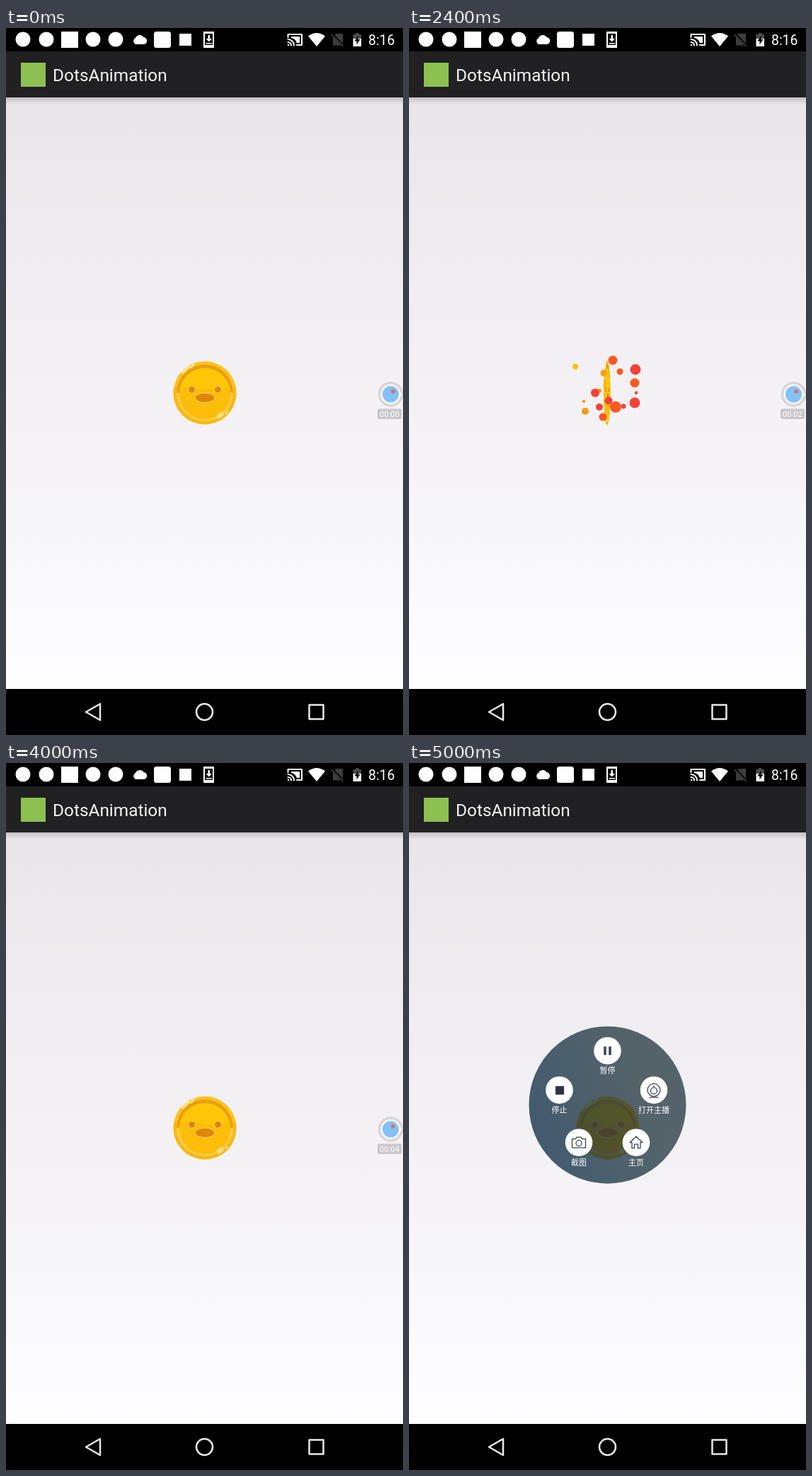
An HTML page for the animation above (5100 ms loop, 561 by 998 pixels).

```html
<!DOCTYPE html>
<html lang="en">
<head>
<meta charset="utf-8">
<title>DotsAnimation</title>
<style>
  html, body { margin: 0; width: 100%; height: 100%; overflow: hidden; background: #fff; }
  svg { position: absolute; left: 0; top: 0; }
  text { font-family: Roboto, "Noto Sans CJK SC", "Noto Sans CJK", sans-serif; fill: #fff; }
  #coin { left: 235.5px; top: 470px; }
  .mid { text-anchor: middle; }
  .line { fill: none; stroke-linejoin: round; stroke-linecap: round; }
</style>
</head>
<body>
<svg width="561" height="998">
  <defs>
    <linearGradient id="page" x2="0" y2="1">
      <stop offset="0" stop-color="#e8e6e9"/>
      <stop offset=".25" stop-color="#eeecf0"/>
      <stop offset=".5" stop-color="#f4f1f5"/>
      <stop offset=".73" stop-color="#f7f6f9"/>
      <stop offset="1" stop-color="#fefdff"/>
    </linearGradient>
    <linearGradient id="shade" x2="0" y2="1">
      <stop offset="0" stop-opacity=".16"/>
      <stop offset="1" stop-opacity="0"/>
    </linearGradient>
  </defs>
  <rect width="561" height="998"/>
  <rect y="98" width="561" height="835" fill="url(#page)"/>
  <rect y="98" width="561" height="10" fill="url(#shade)"/>
  <rect y="33" width="561" height="65" fill="#212022"/>
  <rect x="21" y="49" width="35" height="34" fill="#8cc152"/>
  <text x="66" y="75" font-size="24.4" style="fill:#f4f4f4">DotsAnimation</text>

  <g fill="#fff">
    <circle cx="24" cy="16" r="10.5"/>
    <circle cx="57" cy="16" r="10.5"/>
    <rect x="78" y="5" width="24" height="23"/>
    <circle cx="123" cy="16" r="10.5"/>
    <circle cx="155" cy="16" r="10.5"/>
    <path d="M183 23a5 5 0 0 1 0-9a6.500 6.500 0 0 1 11.500-1a5 5 0 0 1-.5 10z"/>
    <rect x="209" y="5" width="24" height="23" rx="3.500"/>
    <rect x="245" y="8" width="17" height="17"/>
    <path d="M279 5h15v23h-15zM281 8v16h11v-16z" fill-rule="evenodd"/>
    <path d="M285.500 10h2.500v5h3l-4.250 4.500l-4.250-4.500h3zM282.500 21h8.500v1.500h-8.500z"/>
    <path d="M427 11.500q12-9 24 0L439 26z"/>
    <path d="M490.500 15h11.500v11h-11.500z"/>
  </g>
  <path class="line" d="M398.500 13V9h19.500v15h-7M398.500 16a8.500 8.500 0 0 1 8.500 8.500M398.500 20a4.500 4.500 0 0 1 4.500 4.500" stroke="#fff" stroke-width="2"/>
  <path d="M403 12h12v9h-4q-2-6-8-7z" fill="#fff"/>
  <path d="M398 22.500a2.500 2.500 0 0 1 2.500 2.500h-2.500z" fill="#fff"/>
  <path d="M466 8h10v16.500h-14v-12.500z" fill="#3d3d3d"/>
  <path d="M460 8l17 17.500" stroke="#000" stroke-width="3.500"/>
  <path d="M459.500 9l17 16.500" stroke="#484848" stroke-width="1.500"/>
  <path d="M490.500 9h3.500v-2h4.500v2h3.500v6h-11.500z" fill="#4a4a4a"/>
  <path d="M497.500 11l-5 7.500h3v5l5-7.500h-3z"/>
  <text x="512" y="24" font-size="19.4">8:16</text>

  <g class="line" stroke="#e9e9e9" stroke-width="2.500">
    <path d="M113 965.500L133 954v23z"/>
    <circle cx="280.500" cy="965.500" r="11.500"/>
    <rect x="428.500" y="955.500" width="20" height="20"/>
  </g>
</svg>

<svg id="coin" width="90" height="90" viewBox="-45 -45 90 90">
  <clipPath id="rim"><circle r="44.500"/></clipPath>
  <circle r="44.500" fill="#fdc21c"/>
  <g clip-path="url(#rim)">
    <path d="M-45-8Q-20-11 0-6T45-9V45H-45z" fill="#fbb910"/>
    <circle r="40" fill="#fdcb4c"/>
    <path d="M-40 0a40 40 0 0 1 80 0z" fill="#e7a012"/>
    <circle r="36" cy="1" fill="#fec606"/>
    <path d="M-35-7Q-18-10 0-6T35-8A36 36 0 1 1-35-7z" fill="#fdbd08"/>
    <g stroke="#fde48c">
      <path d="M-33-29l10-10" stroke-width="7"/>
      <path d="M-20-35l5-6" stroke-width="3"/>
      <path d="M18 35l7-6" stroke-width="6"/>
      <path d="M29 30l4-4" stroke-width="2"/>
    </g>
  </g>
  <g fill="#e0860a" stroke="#fcd76c" stroke-width="1">
    <circle cx="-18.500" cy="-4.500" r="5"/>
    <circle cx="18.500" cy="-4.500" r="5"/>
    <ellipse cy="7" rx="14" ry="6.800"/>
  </g>
</svg>

<svg width="561" height="998">
  <defs>
    <linearGradient id="glass" x1="0" y1=".7" x2=".75" y2=".4">
      <stop offset="0" stop-color="#00223e"/>
      <stop offset="1" stop-color="#1a2f36"/>
    </linearGradient>
  </defs>
  <g id="dots"></g>

  <g id="recorder">
    <circle cx="543.500" cy="517" r="16" fill="#f8f6fa" stroke="#d8d4da" stroke-width="3.500"/>
    <path d="M556 512.500l4 4.500l-4 4.500z" fill="#fff"/>
    <circle cx="543.500" cy="517" r="11.500" fill="#83c1f8"/>
    <circle id="lamp" cx="547" cy="513" r="2.800" fill="#e26a60"/>
    <rect x="525" y="537.500" width="34" height="14.500" rx="2.500" fill="#c9c7cb"/>
    <text id="clock" class="mid" x="542" y="549" font-size="11.2"></text>
  </g>

  <g id="menu">
    <circle r="111" fill="url(#glass)" fill-opacity=".73"/>
    <g id="items"></g>
  </g>
</svg>

<script>
const $ = id => document.getElementById(id);
const clamp = v => Math.max(0, Math.min(1, v));
const easeInOut = p => (1 - Math.cos(Math.PI * clamp(p))) / 2;
const easeOutBack = p => 1 + 2.4 * (p - 1) ** 3 + 1.4 * (p - 1) ** 2;

const LOOP = 5100, STEP = 100;
const COLORS = ['#ffc107', '#f59b0b', '#ff5722', '#f44336'];

// x and y offset halfway through the burst, radius, colour
const DOTS = [
  [-46, -37, 4, 0], [-6, -28, 4.5, 1], [39, -33, 7.5, 3], [17, -30, 4.5, 2],
  [38, -14, 6.5, 2], [40, 0, 2.3, 3], [38, 14, 7.5, 3], [-12, -3, 3, 1],
  [-18, 0, 6, 3], [-34, 12, 2.3, 1], [-32, 26, 5, 1], [-12, 20, 5, 3],
  [1, 11, 5.5, 3], [-7, 34, 5.5, 2], [22, 19, 3.5, 3], [7, -46, 6.5, 2],
  [11, 20, 8, 2]
];

// Label, centre and icon outline of each menu button
const ITEMS = [
  ['暂停', 0, -76.5, '<path d="M-3.500-6v12M3.500-6v12" stroke-width="3.500" stroke-linecap="butt"/>'],
  ['打开主播', 65.5, -21, '<circle r="9"/><circle cy="1" r="4.500"/><path d="M-6 10.500h12M-1-5.500h2"/>'],
  ['主页', 40.5, 53, '<path d="M-9 0L0-8.500L9 0H6v8H2.500V2.500h-5V8H-6V0z"/>'],
  ['截图', -40.5, 53, '<path d="M-9.500-5h5l1.500-2.500h6l1.500 2.500h5V7.500h-19z"/><circle cy="1" r="4"/>'],
  ['停止', -68, -21, '<rect x="-5" y="-5" width="11" height="11" fill="#30343f"/>']
];

$('dots').innerHTML = DOTS.map(d => `<circle fill="${COLORS[d[3]]}"/>`).join('');
$('items').innerHTML = ITEMS.map(([label, x, y, icon]) => `
  <g transform="translate(${x} ${y})">
    <circle r="19.3" fill="#fff"/>
    <g class="line" stroke="#3b4350" stroke-width="1.3">${icon}</g>
    <text class="mid" y="32" font-size="11">${label}</text>
  </g>`).join('');

const lampTimes = [[0, 400], [700, 1000], [1700, 1900], [2400, 2900], [3900, 4300]];

function drawDots(t) {
  const spread = 2 * easeInOut((t - 1800) / 1200);
  const size = t < 1900 ? 0 : clamp((3200 - t) / 300);
  DOTS.forEach(([x, y, r], i) => {
    const dot = $('dots').children[i];
    dot.setAttribute('cx', 281 + x * spread);
    dot.setAttribute('cy', 515 + y * spread);
    dot.setAttribute('r', r * size);
  });
}

function drawRecorder(t) {
  const seconds = t < 1000 ? 0 : Math.floor((t + 100) / 1000);
  $('recorder').style.display = t < 4500 ? '' : 'none';
  $('lamp').style.display = lampTimes.some(([a, b]) => t >= a && t < b) ? '' : 'none';
  $('clock').textContent = '00:0' + seconds;
}

function drawMenu(t) {
  const open = t > 4600;
  $('menu').style.display = open ? '' : 'none';
  if (open) $('menu').setAttribute('transform',
    `translate(280.5 482.7) scale(${easeOutBack((t - 4600) / 400)})`);
}

function frame(now) {
  const t = Math.floor(now % LOOP / STEP) * STEP;
  const turn = 1800 * easeInOut((t - 1722) / 1455);
  $('coin').style.transform = `perspective(200px) rotateY(${turn}deg)`;
  drawDots(t);
  drawRecorder(t);
  drawMenu(t);
  requestAnimationFrame(frame);
}
frame(performance.now());
</script>
</body>
</html>
```
